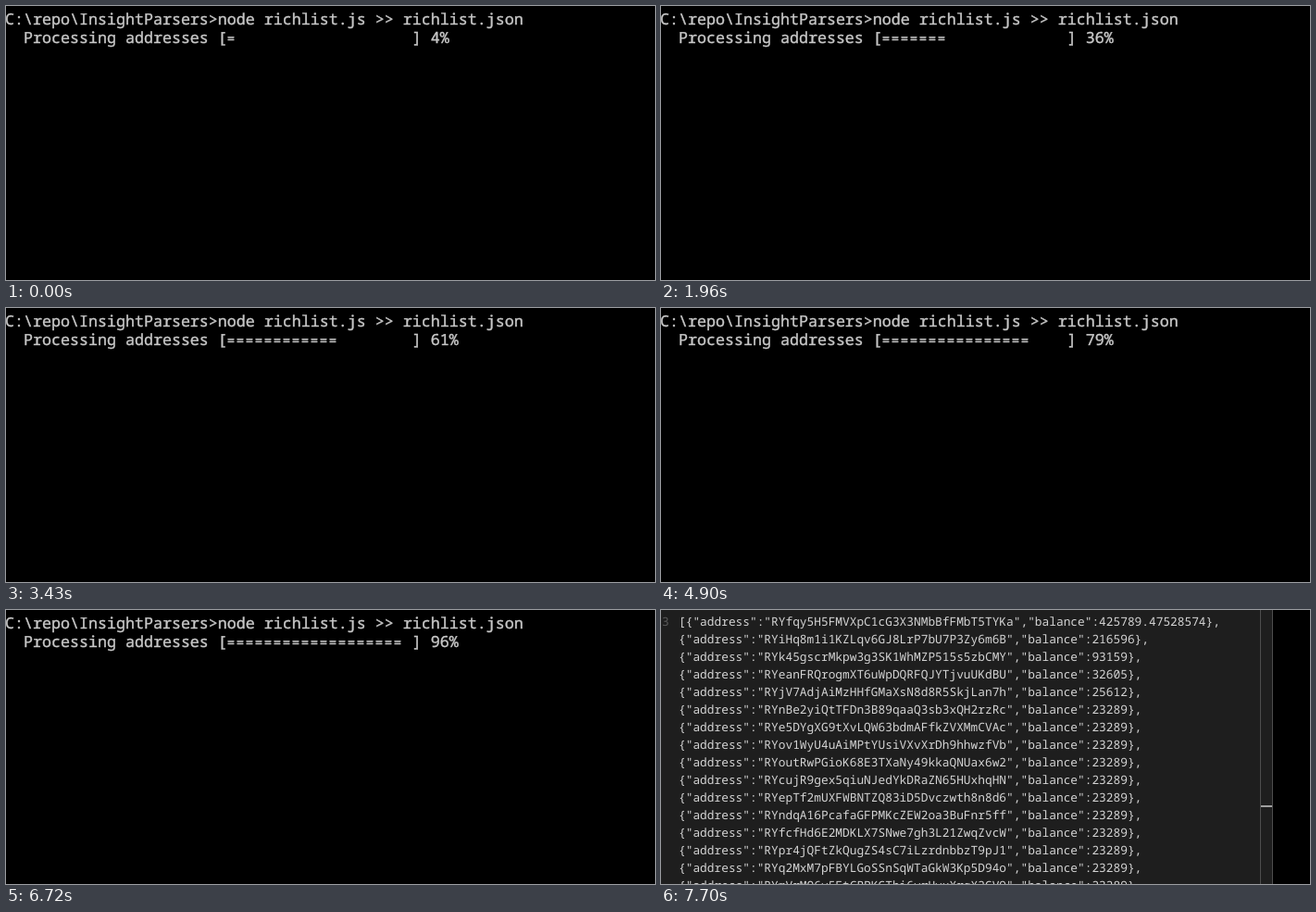
These frames come from a looping animation (701 px wide and 296 px high, 8 s). An HTML page:

```html
<!DOCTYPE html>
<html lang="en">
<head>
<meta charset="utf-8">
<title>Rich list</title>
<style>
  html, body { margin: 0; width: 100%; height: 100%; overflow: hidden; background: #000; }
  pre {
    position: absolute; margin: 0; white-space: pre;
    font-family: "Noto Sans Mono", "DejaVu Sans Mono", monospace;
    text-rendering: geometricPrecision;
  }
  #console {
    left: -1px; top: 4px; font-size: 16.667px; line-height: 20px; font-weight: 500;
    color: #c8c8c8; -webkit-text-stroke: 0.4px #c8c8c8;
  }
  /* Shorter dashes on the same 10px grid */
  #bar { font-size: 14px; letter-spacing: 1.6px; line-height: 0; }
  #editor { position: absolute; inset: 0 auto 0 0; width: 661px; overflow: hidden; background: #1e1e1e; }
  #editor pre { top: 3px; font-size: 12.83px; line-height: 19px; color: #d4d4d4; }
  #editor .line { left: 1px; color: #5a5a5a; }
  #rows { left: 19px; }
  #ruler {
    position: absolute; left: 647px; top: 0; width: 12px; height: 100%;
    border: solid #4d4d4d; border-width: 0 1px;
  }
  #ruler i { position: absolute; left: 0; right: 0; top: 211px; height: 2px; background: #a0a0a0; }
</style>
</head>
<body>
<pre id="console">C:\repo\InsightParsers&gt;node richlist.js &gt;&gt; richlist.json
  Processing addresses [<span id="bar"></span>] <span id="percent"></span>
<span id="prompt">C:\repo\InsightParsers&gt;</span></pre>
<div id="editor">
  <pre class="line">3</pre>
  <pre id="rows"></pre>
  <div id="ruler"><i></i></div>
</div>
<script>
const LOOP = 8000, TOTAL = 28, WIDTH = 20, PROMPT_AT = 6930, EDITOR_AT = 7700;

// Times at which one more request completes
const ticks = [
  0, 280, 490, 630, 770, 980, 1120, 1330, 1470,
  1960, 2100, 2310, 2450, 2870, 3080, 3220, 3430, 3640, 3780,
  3990, 4200, 4900, 5320, 5460, 5880, 6090, 6510, 6790
];

const balances = ['425789.47528574', 216596, 93159, 32605, 25612];
const addresses = `
RYfqy5H5FMVXpC1cG3X3NMbBfFMbT5TYKa
RYiHq8m1i1KZLqv6GJ8LrP7bU7P3Zy6m6B
RYk45gscrMkpw3g3SK1WhMZP515s5zbCMY
RYeanFRQrogmXT6uWpDQRFQJYTjvuUKdBU
RYjV7AdjAiMzHHfGMaXsN8d8R5SkjLan7h
RYnBe2yiQtTFDn3B89qaaQ3sb3xQH2rzRc
RYe5DYgXG9tXvLQW63bdmAFfkZVXMmCVAc
RYov1WyU4uAiMPtYUsiVXvXrDh9hhwzfVb
RYoutRwPGioK68E3TXaNy49kkaQNUax6w2
RYcujR9gex5qiuNJedYkDRaZN65HUxhqHN
RYepTf2mUXFWBNTZQ83iD5Dvczwth8n8d6
RYndqA16PcafaGFPMKcZEW2oa3BuFnr5ff
RYfcfHd6E2MDKLX7SNwe7gh3L21ZwqZvcW
RYpr4jQFtZkQugZS4sC7iLzrdnbbzT9pJ1
RYq2MxM7pFBYLGoSSnSqWTaGkW3Kp5D94o
RYmVrMQ6y5EtCBPKGThi6yrHvxXrgX2GV9`.trim().split('\n');

const byId = id => document.getElementById(id);
const bar = byId('bar'), percent = byId('percent'), prompt = byId('prompt'), editor = byId('editor');

byId('rows').textContent = '[' + addresses
  .map((address, i) => `{"address":"${address}","balance":${balances[i] ?? 23289}},`)
  .join('\n');

function draw() {
  const t = performance.now() % LOOP;
  const done = ticks.filter(tick => tick <= t).length / TOTAL;
  bar.textContent = '='.repeat(Math.round(WIDTH * done)).padEnd(WIDTH);
  percent.textContent = Math.round(100 * done) + '%';
  prompt.hidden = t < PROMPT_AT;
  editor.hidden = t < EDITOR_AT;
  requestAnimationFrame(draw);
}
draw();
</script>
</body>
</html>
```
